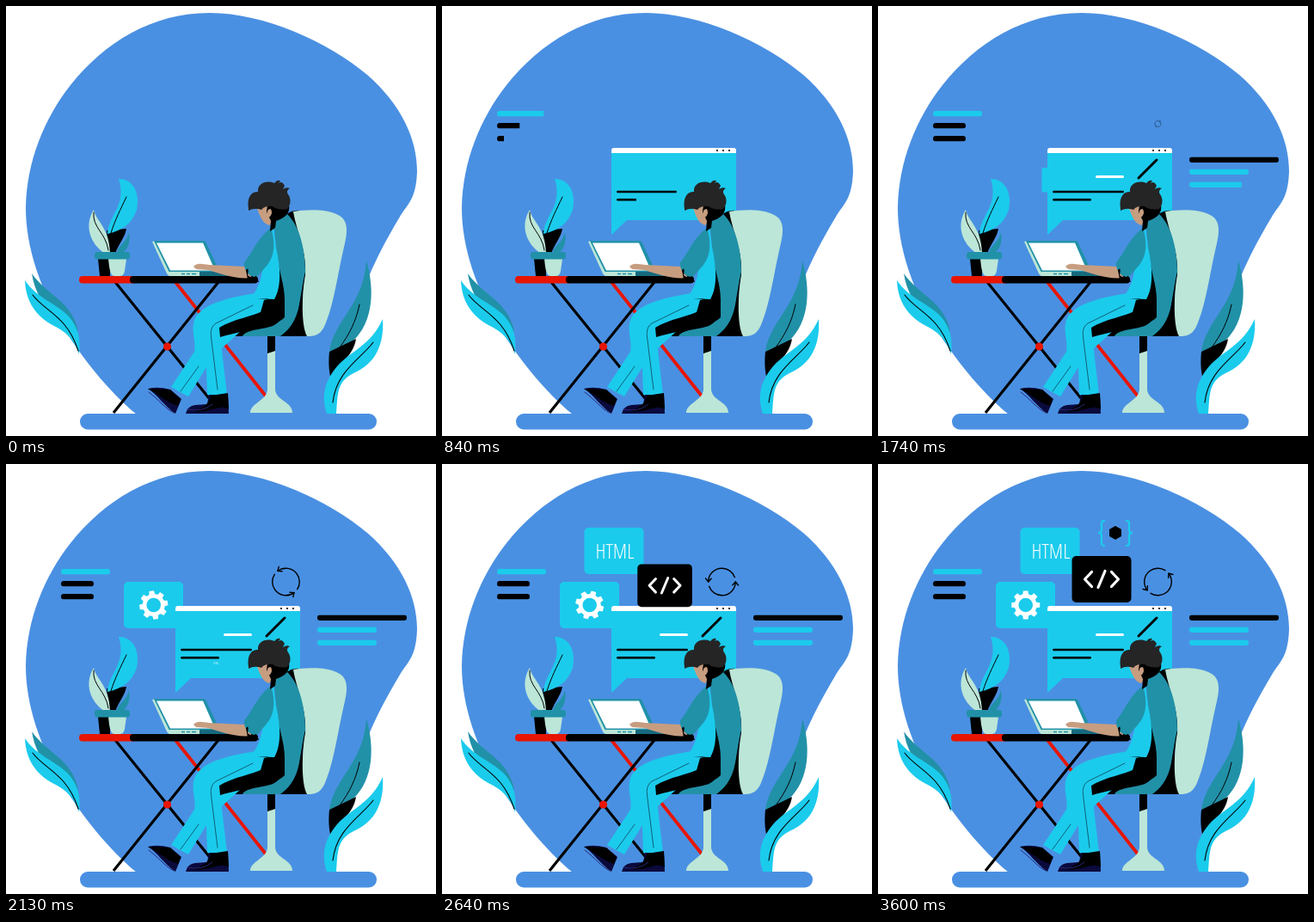
An HTML page with a canvas that plays this animation: 500x500 px, repeating every 4110 ms.

```html
<!DOCTYPE html>
<html lang="en">
<head>
<meta charset="utf-8">
<title>Working at a desk</title>
<style>
html, body { margin: 0; width: 100%; height: 100%; overflow: hidden; background: #fff; }
canvas { display: block; width: 500px; height: 500px; }
</style>
</head>
<body>
<canvas id="stage" width="500" height="500"></canvas>
<script>
const LOOP = 4110, STEP = 30, STOP = 3600;
const BLUE = '#4a90e2', CYAN = '#1bcbec', TEAL = '#2191a8', MINT = '#bce6d7',
      BLACK = '#000', WHITE = '#fff', RED = '#e81502', SKIN = '#c79d80',
      HAIR = '#252525', NAVY = '#0b0a3d';
const ctx = document.getElementById('stage').getContext('2d');

function fill(color, d) {
  ctx.fillStyle = color;
  ctx.fill(new Path2D(d));
}

function stroke(color, width, d, cap = 'round') {
  ctx.strokeStyle = color;
  ctx.lineWidth = width;
  ctx.lineCap = cap;
  ctx.lineJoin = 'round';
  ctx.stroke(new Path2D(d));
}

function box(color, x, y, w, h, r) {
  ctx.fillStyle = color;
  ctx.beginPath();
  ctx.roundRect(x, y, w, h, r);
  ctx.fill();
}

function dot(color, x, y, r) {
  ctx.fillStyle = color;
  ctx.beginPath();
  ctx.arc(x, y, r, 0, Math.PI * 2);
  ctx.fill();
}

const progress = (t, start, length) => Math.min(1, Math.max(0, (t - start) / length));
const easeOut = p => 1 - (1 - p) ** 2;
const backOut = p => 1 + 2.7 * (p - 1) ** 3 + 1.7 * (p - 1) ** 2;

// Scale a drawing around a fixed point.
function grow(scale, x, y, draw) {
  if (scale <= 0) return;
  ctx.save();
  ctx.translate(x, y);
  ctx.scale(scale, scale);
  ctx.translate(-x, -y);
  draw();
  ctx.restore();
}

// Uncover a rounded bar from the left.
function bar(color, x, y, w, h, p) {
  if (p <= 0) return;
  ctx.save();
  ctx.beginPath();
  ctx.rect(x, y, w * p, h);
  ctx.clip();
  box(color, x, y, w, h, h / 2);
  ctx.restore();
}

function backdrop() {
  fill(WHITE, 'M0 0H500V500H0Z');
  fill(BLUE, `M237 8C300 8 375 42 420 80C460 115 478 155 478 192C477 225 467 230 458 245
    C440 275 424 305 410 345C395 390 388 430 380 475H152C118 447 88 408 68 376
    C40 330 23 280 23 235C24 180 45 130 75 92C115 42 170 8 237 8Z`);
  box(BLUE, 86, 474, 345, 18.5, 9);
}

function floorLeaves() {
  fill(TEAL, 'M30 311C48 337 76 342 84 378C64 368 36 350 30 311Z');
  fill(CYAN, 'M22 319C36 340 58 345 73 361C84 374 87 386 85 405C80 388 70 379 54 371C36 361 23 345 22 319Z');
  stroke(BLACK, 1.1, 'M31 336C45 355 71 360 84 401');
  fill(TEAL, 'M419 296C429 330 427 367 404 389L376 402C381 365 416 348 419 296Z');
  fill(BLACK, 'M376 402L407 387C404 407 388 414 378 434C375 424 375 412 376 402Z');
  stroke(BLACK, 1, 'M411 347C407 367 399 382 388 397');
  fill(CYAN, 'M438 364C440 393 430 416 404 427C384 437 386 452 384 474H373C367 455 369 438 385 419C402 400 424 395 438 364Z');
  stroke(BLACK, 1.1, 'M427 391C413 410 384 424 380 461');
}

function pottedPlant() {
  fill(BLACK, 'M117 261L140 259C138 270 131 276 127 288H119Z');
  fill(CYAN, 'M131 201C149 201 156 219 152 237C147 252 136 261 118 265C119 243 141 232 131 201Z');
  stroke(BLACK, 1, 'M140 222C133 237 127 248 122 264');
  fill(TEAL, 'M143 263C145 274 142 282 136 287H129C130 278 141 275 143 263Z');
  fill(MINT, 'M102 237C105 251 120 257 121 287H114C99 277 90 256 102 237Z');
  stroke(BLACK, 1, 'M102 240C100 258 116 263 119 284');
  fill(BLACK, 'M107 294H121V314H109Z');
  fill(MINT, 'M119 294H140L138 308C137 313 135 314 131 314H126C121 314 120 304 119 294Z');
  box(TEAL, 103, 286, 41, 8.5, 3);
}

function table() {
  stroke(RED, 3.8, 'M197 321L304 456', 'butt');
  stroke(BLACK, 3.2, 'M127 321L240 461M247 321L125 473', 'butt');
  dot(RED, 187.5, 396, 4.6);
  box(RED, 85, 314, 66, 8.5, 4);
  box(BLACK, 144, 314, 149, 8.5, 4);
}

function laptop() {
  fill(MINT, 'M170 274L174 273L192 309H228V314H191Q188 314 186 309Z');
  fill(TEAL, 'M172 273H230Q232 273 233 276L249 310H190Z');
  fill(WHITE, 'M175 275.5H229L243 307.5H191Z');
  fill(MINT, 'M188 309H228V314H192Q189 314 188 309Z');
  fill('#16697d', 'M225 309H266L292 314H225Z');
  stroke(TEAL, 1.3, 'M204 311.5H208M210 311.5H214M216 311.5H221', 'butt');
}

function chair() {
  box(BLACK, 304, 382, 9, 23, 0);
  fill(MINT, 'M304 404L313 401V446C314 459 333 460 333 473H284C284 462 303 459 304 446Z');
  fill(BLACK, 'M324 244Q334 235 345 239C338 257 350 283 349 310C344 332 343 359 351 384H249V375L320 330Z');
  fill(MINT, `M334 239C350 236 377 236 388 244C398 250 397 263 394 276C386 309 381 350 370 373
    C365 383 358 384 350 384C343 371 344 335 348 313C350 285 338 263 334 239Z`);
}

function legs() {
  fill(CYAN, `M290 334C260 339 232 345 221 361C213 375 222 391 219 402L192 443Q202 449 212 454
    L241 407L304 350L315 337Z`);
  fill(CYAN, 'M318 340L290 336L245 361C233 367 231 379 232 390L234 452H257L249 383L300 357Z');
  stroke('#0e6176', 1, 'M287 348L244 369C237 374 238 381 239 389L246 446M224 419L203 448');
  fill(BLACK, 'M292 340L324 341V363C316 371 282 376 249 385L248 374C264 364 287 361 300 354L313 342Z');
  fill(TEAL, 'M275 384C279 376 300 376 310 372C322 367 324 355 325 344L342 340C340 360 333 374 319 384Z');
}

function shoes() {
  fill(NAVY, 'M165 445Q177 442 191 446L204 457L197 474C183 464 176 452 165 445Z');
  fill(BLACK, 'M165 445L191 446L203 457L200 465C186 461 177 451 165 445Z');
  fill(NAVY, 'M236 452H258L259 474H209Q211 465 220 464L234 463Z');
  fill(BLACK, 'M238 453L258 450L259 469C247 462 240 474 216 471Q235 468 238 453Z');
  stroke('#282779', 1, 'M166 449C178 458 185 468 195 473M211 469Q228 473 240 463');
}

function torso() {
  fill(TEAL, 'M311 249L327 242C342 256 348 285 348 309C343 328 343 354 330 372L322 380L316 300Z');
  fill(BLACK, 'M316 292C317 309 324 323 324 342V362C316 370 305 371 291 374L300 342L313 339Z');
  fill(CYAN, 'M311 257L314 281C319 302 321 326 312 341Q301 341 288 335C298 321 299 303 300 288Z');
  fill(SKIN, 'M218 303C222 298 228 300 236 301L278 303L286 316C268 318 250 312 236 307L221 306Z');
  fill(TEAL, 'M308 258C313 273 313 290 304 301L292 315C284 316 276 309 277 298C287 287 291 271 308 258Z');
  fill(BLACK, 'M279 307Q283 302 281 313Q285 317 291 314L294 321L281 318Z');
}

function head() {
  fill(SKIN, 'M292 235L306 230L313 247L306 255C299 253 296 247 292 235Z');
  fill(BLACK, 'M304 232L329 231C331 242 323 247 314 250L313 258L307 262L308 250L303 239Z');
  fill(HAIR, `M282 236C280 221 286 216 293 216C292 207 302 202 312 206Q315 202 319 203L317 206
    Q321 203 324 209L322 213Q326 210 330 212Q325 215 328 219C332 224 331 232 327 236
    C322 237 315 237 310 233Q301 232 297 237Q289 234 282 238Z`);
  fill(SKIN, 'M304 238Q309 233 309 241Q307 247 304 245Z');
}

function bubble() {
  fill(CYAN, 'M197 167H342V249H215L197 266Z');
  box(WHITE, 197, 165, 145, 6, [3, 3, 0, 0]);
  for (const x of [320, 327, 334]) dot(BLACK, x, 168, 1.1);
}

function bubbleLines(t) {
  const p = i => easeOut(progress(t, 660 + i * 90, 300));
  bar(BLACK, 203, 214.6, 83, 3, p(0));
  bar(BLACK, 203, 223.7, 45, 3, p(1));
  bar(WHITE, 253, 197, 33, 3, p(2));
  const d = 21 * p(3);
  if (d) stroke(BLACK, 3, `M303 200l${d} ${-d}`);
}

function sideLines(t) {
  const left = i => easeOut(progress(t, 560 + i * 120, 360));
  bar(CYAN, 64, 122, 57, 6.5, left(0));
  bar(BLACK, 64, 136, 38, 6.5, left(1));
  bar(BLACK, 64, 151, 38, 6.5, left(2));
  const right = i => easeOut(progress(t, 1225 + i * 130, 390));
  bar(BLACK, 362, 175.5, 104, 6.4, right(0));
  bar(CYAN, 362, 189.6, 69, 6.4, right(1));
  bar(CYAN, 362, 204.5, 69, 6.4, right(2));
}

// Degrees left to turn; slows down until everything rests.
const turnLeft = t => 151 * (Math.max(0, STOP - t) / 1000) ** 1.5;

function gearCard(turn) {
  box(CYAN, 137, 137, 69, 54, 5);
  ctx.save();
  ctx.translate(171.7, 164);
  ctx.rotate(-turn * Math.PI / 180);
  for (let i = 0; i < 8; i++) {
    fill(WHITE, 'M-3.6 -11L-2.8 -16.5H2.8L3.6 -11Z');
    ctx.rotate(Math.PI / 4);
  }
  ctx.strokeStyle = WHITE;
  ctx.lineWidth = 4.6;
  ctx.beginPath();
  ctx.arc(0, 0, 10.6, 0, Math.PI * 2);
  ctx.stroke();
  ctx.restore();
}

function htmlCard() {
  box(CYAN, 165.5, 74, 69, 54, 5);
  const font = size => `300 condensed ${size}px "Open Sans", sans-serif`;
  ctx.font = font(25);
  ctx.font = font(Math.min(25, 25 * 45 / ctx.measureText('HTML').width));
  ctx.textAlign = 'center';
  ctx.textBaseline = 'alphabetic';
  ctx.fillStyle = WHITE;
  ctx.fillText('HTML', 201, 110);
}

function codeCard() {
  box(BLACK, 225.5, 107, 69, 54, 5);
  stroke(WHITE, 3.2, 'M248.5 125.5L240.5 134L248.5 142.5M264 124.5L256 143.5M271.5 125.5L279.5 134L271.5 142.5');
}

function braces() {
  const half = 'M263 66C259 66 260 69 260 73V76Q260 80 257 80Q260 80 260 84V88C260 92 259 95 263 95';
  stroke(CYAN, 2.3, half);
  ctx.save();
  ctx.translate(552, 0);
  ctx.scale(-1, 1);
  stroke(CYAN, 2.3, half);
  ctx.restore();
  fill(BLACK, 'M276 72L283 76V84L276 88L269 84V76Z');
}

function refresh(turn) {
  ctx.save();
  ctx.translate(325.5, 137);
  ctx.rotate((-38 - turn) * Math.PI / 180);
  for (let i = 0; i < 2; i++) {
    ctx.strokeStyle = BLACK;
    ctx.lineWidth = 1.4;
    ctx.beginPath();
    ctx.arc(0, 0, 15.8, 0, 2.8);
    ctx.stroke();
    stroke(BLACK, 1.4, 'M12.4 3.8L15.8 0L19 4');
    ctx.rotate(Math.PI);
  }
  ctx.restore();
}

function render(t) {
  const turn = turnLeft(t);
  const pop = (start, length) => easeOut(progress(t, start, length));
  backdrop();
  sideLines(t);
  grow(pop(1590, 480), 250, 245, () => gearCard(turn * 0.2));
  grow(backOut(progress(t, 30, 420)), 197, 265, bubble);
  bubbleLines(t);
  grow(pop(2090, 500), 252, 255, htmlCard);
  grow(pop(2280, 500), 248, 227, codeCard);
  grow(pop(2700, 420), 276, 80, braces);
  grow(pop(1700, 330), 325.5, 137, () => refresh(turn));
  floorLeaves();
  pottedPlant();
  table();
  laptop();
  chair();
  legs();
  shoes();
  torso();
  head();
}

function tick(now) {
  const t = now % LOOP;
  render(Math.min(STOP, Math.floor(t / STEP) * STEP));
  requestAnimationFrame(tick);
}
tick(performance.now());
</script>
</body>
</html>
```
